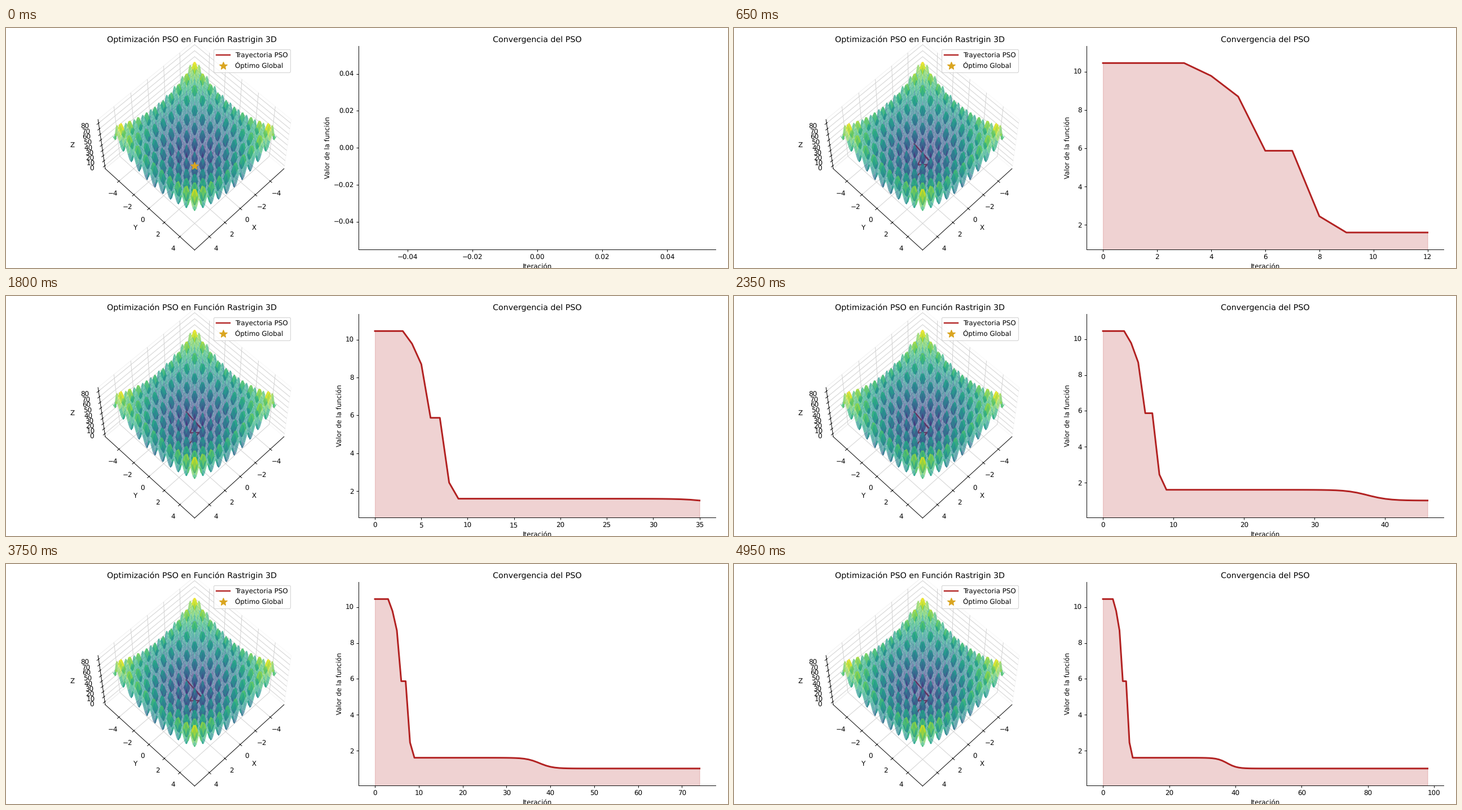
Animation, 1280 px wide and 427 px high, one loop 5 s. Source, as a matplotlib script:

```python
import numpy as np
import matplotlib.pyplot as plt
from matplotlib.animation import FuncAnimation

W, H = 1280, 427
FRAMES = 100
RED, GOLD = "firebrick", "goldenrod"
BOUND = 5.12

plt.rcParams.update({"text.hinting": "none", "grid.color": "#d0d0d0"})


def rastrigin(x, y):
    return sum(v**2 - 10 * np.cos(2 * np.pi * v) + 10 for v in (x, y))


def pixel_axes(left, bottom, width, height, **kw):
    return fig.add_axes((left / W, bottom / H, width / W, height / H), **kw)


# The swarm improves in a few early stages, then slides into a local minimum
its = np.arange(FRAMES)
stage = np.searchsorted([4, 5, 6, 8, 9], its, side="right")
best = 1 + 0.6 / (1 + np.exp((its - 37.5) / 1.5))
early = stage < 5
best[early] = np.array([10.45, 9.78, 8.70, 5.87, 2.45])[stage[early]]

# Best position per stage, as screen directions: right (y - x), down (y + x)
right = np.array([-1.1, 0.8, 0.0, -0.6, 0.6, -0.6])[stage]
down = np.array([-2.5, -0.1, -1.1, 0.3, 0.0, 1.5])[stage]
path_x, path_y = (down - right) / 2, (down + right) / 2

fig = plt.figure(figsize=(15, H * 15 / W), dpi=W / 15)
ax3 = pixel_axes(148.6, 33, 361.8, 361.8, projection="3d")
ax2 = pixel_axes(625.3, 33, 633, 361.8)

# Left panel: surface, trajectory and optimum
axis = np.linspace(-BOUND, BOUND, 100)
X, Y = np.meshgrid(axis, axis)
Z = rastrigin(X, Y)
surf = ax3.plot_surface(X, Y, Z, cmap="viridis", alpha=0.7, edgecolor="none")
path, = ax3.plot([], [], [], color=RED, lw=2, label="Trayectoria PSO")
star, = ax3.plot([0], [0], [0], "*", color=GOLD, ms=12.5, zorder=10,
                 label="Óptimo Global")

margin = 1.1 * 25 / 24
lim, mid = BOUND * margin, Z.max() / 2
ax3.set(xlim=(-lim, lim), ylim=(-lim, lim),
        zlim=(mid - mid * margin, mid + mid * margin),
        xticks=range(-4, 5, 2), yticks=range(-4, 5, 2),
        zticks=range(0, 81, 10), xlabel="X", ylabel="Y", zlabel="Z",
        title="Optimización PSO en Función Rastrigin 3D")
for a in (ax3.xaxis, ax3.yaxis, ax3.zaxis):
    a.pane.fill = False
ax3.view_init(elev=60, azim=45)
ax3.legend(loc="upper right")

# The view never moves, so project the surface only once
fig.canvas.draw()
depth = surf.do_3d_projection()
surf.do_3d_projection = lambda: depth


def update(i):
    path.set_data_3d(path_x[:i], path_y[:i], best[:i])
    star.set_visible(i == 0)

    ax2.clear()
    ax2.spines[["top", "right"]].set_visible(False)
    ax2.set(title="Convergencia del PSO", xlabel="Iteración",
            ylabel="Valor de la función")
    vals = best[:i]
    ax2.plot(its[:i], vals, color=RED, lw=2.5)
    if i:
        ax2.fill_between(its[:i], vals, color=RED, alpha=0.2)
        lo, hi = vals.min(), vals.max()
        pad = 0.1 * (hi - lo) or 0.05 * hi
        ax2.set_ylim(lo - pad, hi + pad)
    return []


anim = FuncAnimation(fig, update, frames=FRAMES, interval=50,
                     init_func=lambda: update(0), repeat=True, repeat_delay=0)
plt.show()
```
